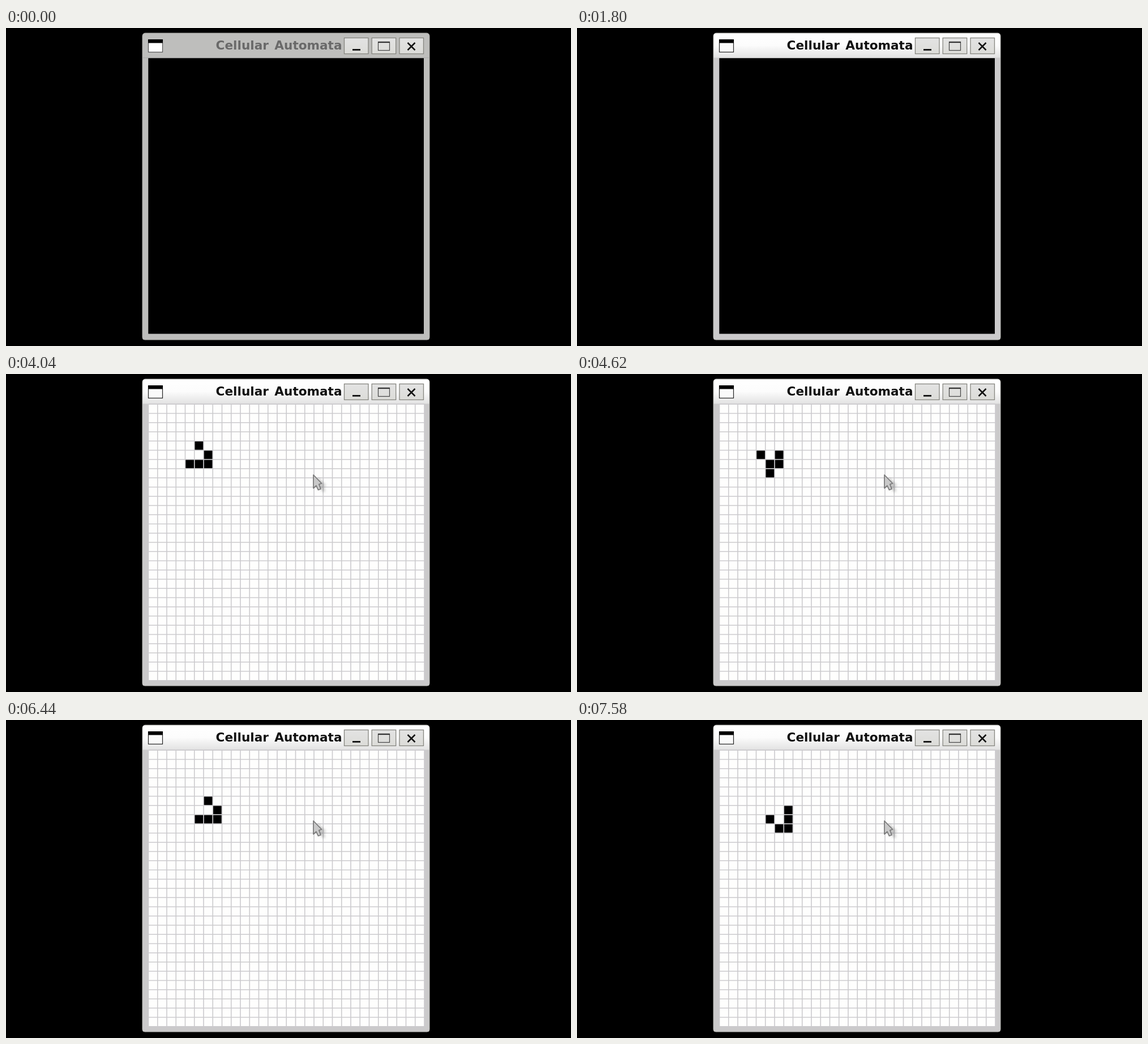
An HTML page with a canvas that plays this animation: 998 px wide and 561 px high, repeating every 8000 ms.

```html
<!DOCTYPE html>
<html lang="en">
<head>
<meta charset="utf-8">
<title>Cellular Automata</title>
<style>
  html, body { margin: 0; width: 100%; height: 100%; overflow: hidden; background: #000; }
  canvas { display: block; width: 998px; height: 561px; }
</style>
</head>
<body>
<canvas id="stage" width="998" height="561"></canvas>
<script>
const ctx = document.getElementById('stage').getContext('2d');
const LOOP = 8000, FOCUS = 1800, POINTER = 2240, START = 4040;
const TICKS = [4620, 5200, 5860, 6440, 7000, 7580];
const GRID = { x: 251.5, y: 53.2, pitch: 16.25, size: 30 };

function rect(x, y, w, h, fill) {
  ctx.fillStyle = fill;
  ctx.fillRect(x, y, w, h);
}

function frame(x, y, w, h, stroke, width) {
  ctx.strokeStyle = stroke;
  ctx.lineWidth = width;
  ctx.strokeRect(x, y, w, h);
}

function line(x1, y1, x2, y2, stroke, width) {
  ctx.strokeStyle = stroke;
  ctx.lineWidth = width;
  ctx.beginPath();
  ctx.moveTo(x1, y1);
  ctx.lineTo(x2, y2);
  ctx.stroke();
}

function verticalGradient(y1, y2, ...colors) {
  const g = ctx.createLinearGradient(0, y1, 0, y2);
  colors.forEach((c, i) => g.addColorStop(i / (colors.length - 1), c));
  return g;
}

// One step of Conway's Life on [column, row] pairs.
function step(cells) {
  const counts = new Map();
  const alive = new Set(cells.map(String));
  for (const [c, r] of cells)
    for (let dc = -1; dc <= 1; dc++)
      for (let dr = -1; dr <= 1; dr++)
        if (dc || dr) {
          const key = String([c + dc, r + dr]);
          counts.set(key, (counts.get(key) || 0) + 1);
        }
  return [...counts]
    .filter(([key, n]) => n === 3 || (n === 2 && alive.has(key)))
    .map(([key]) => key.split(',').map(Number));
}

const generations = [[[5, 4], [6, 5], [4, 6], [5, 6], [6, 6]]];
TICKS.forEach((_, i) => generations.push(step(generations[i])));

function drawButton(x) {
  rect(x, 17.5, 42.5, 28, verticalGradient(17, 46, '#e3e3e3', '#dcdcd8'));
  frame(x, 17.5, 42.5, 28, '#85857f', 1.3);
}

function drawWindow(active) {
  ctx.beginPath();
  ctx.roundRect(241, 9, 507, 541, [5, 5, 4, 4]);
  ctx.fillStyle = active ? '#cbcacb' : '#bebebc';
  ctx.fill();
  if (active) {
    ctx.save();
    ctx.clip();
    rect(241, 9, 507, 43.5, verticalGradient(9, 52.5, '#ffffff', '#fcfcfc', '#e2e2e2'));
    ctx.restore();
  }
  ctx.strokeStyle = active ? '#b9b9b5' : '#aaaaa6';
  ctx.lineWidth = 1;
  ctx.stroke();
  if (!active) line(242, 52.5, 747, 52.5, '#acacac', 1);

  rect(251.5, 21, 25, 21.5, active ? '#fafafa' : '#ffffff');
  frame(251.5, 21, 25, 21.5, active ? '#222' : '#555', 1.2);
  rect(251, 20, 26, 6.5, '#000');

  ctx.font = 'bold 21.6px "DejaVu Sans", sans-serif';
  ctx.fillStyle = active ? '#111' : '#696969';
  ctx.fillText('Cellular', 370.6, 37.8);
  ctx.fillText('Automata', 474.3, 37.8);

  [597.5, 646.2, 695].forEach(drawButton);
  rect(612, 37, 14, 2.8, '#111');
  frame(657.5, 24.5, 20, 15, '#444', 1.2);
  rect(657, 24, 21, 2.2, '#333');
  line(709.5, 26, 722.5, 39, '#111', 2.5);
  line(722.5, 26, 709.5, 39, '#111', 2.5);
}

function drawGrid(cells) {
  const { x, y, pitch, size } = GRID;
  const span = pitch * size;
  rect(x, y, span, span, '#fefefd');
  for (let i = 0; i <= size; i++) {
    const d = i * pitch;
    line(x + d, y, x + d, y + span, '#cbcacd', 1.6);
    line(x, y + d, x + span, y + d, '#cbcacd', 1.6);
  }
  for (const [c, r] of cells)
    rect(x + c * pitch + 0.8, y + r * pitch + 0.8, pitch - 1.6, pitch - 1.6, '#000');
}

function drawPointer(onGrid) {
  const outline = [[543, 178], [543, 201.5], [548, 197], [551.5, 204.5],
                   [556, 202.8], [552.8, 194.5], [557.6, 193]];
  ctx.save();
  ctx.beginPath();
  outline.forEach(([x, y]) => ctx.lineTo(x, y));
  ctx.closePath();
  if (onGrid) {
    ctx.shadowColor = 'rgba(0,0,0,0.22)';
    ctx.shadowBlur = 4;
    ctx.shadowOffsetX = 8;
    ctx.shadowOffsetY = 4;
  }
  ctx.fillStyle = onGrid ? '#c9c9c9' : '#858585';
  ctx.fill();
  ctx.shadowColor = 'transparent';
  if (onGrid) {
    ctx.strokeStyle = '#777';
    ctx.lineWidth = 1.7;
    ctx.lineJoin = 'round';
    ctx.stroke();
  }
  ctx.restore();
}

function draw(t) {
  const running = t >= START;
  rect(0, 0, 998, 561, '#000');
  drawWindow(t >= FOCUS);
  if (running) drawGrid(generations[TICKS.filter(tick => t >= tick).length]);
  else rect(251.3, 53.2, 486.7, 486.3, '#000');
  if (t >= POINTER) drawPointer(running);
}

const origin = performance.now();
function tick() {
  draw((performance.now() - origin) % LOOP);
  requestAnimationFrame(tick);
}
tick();
</script>
</body>
</html>
```
